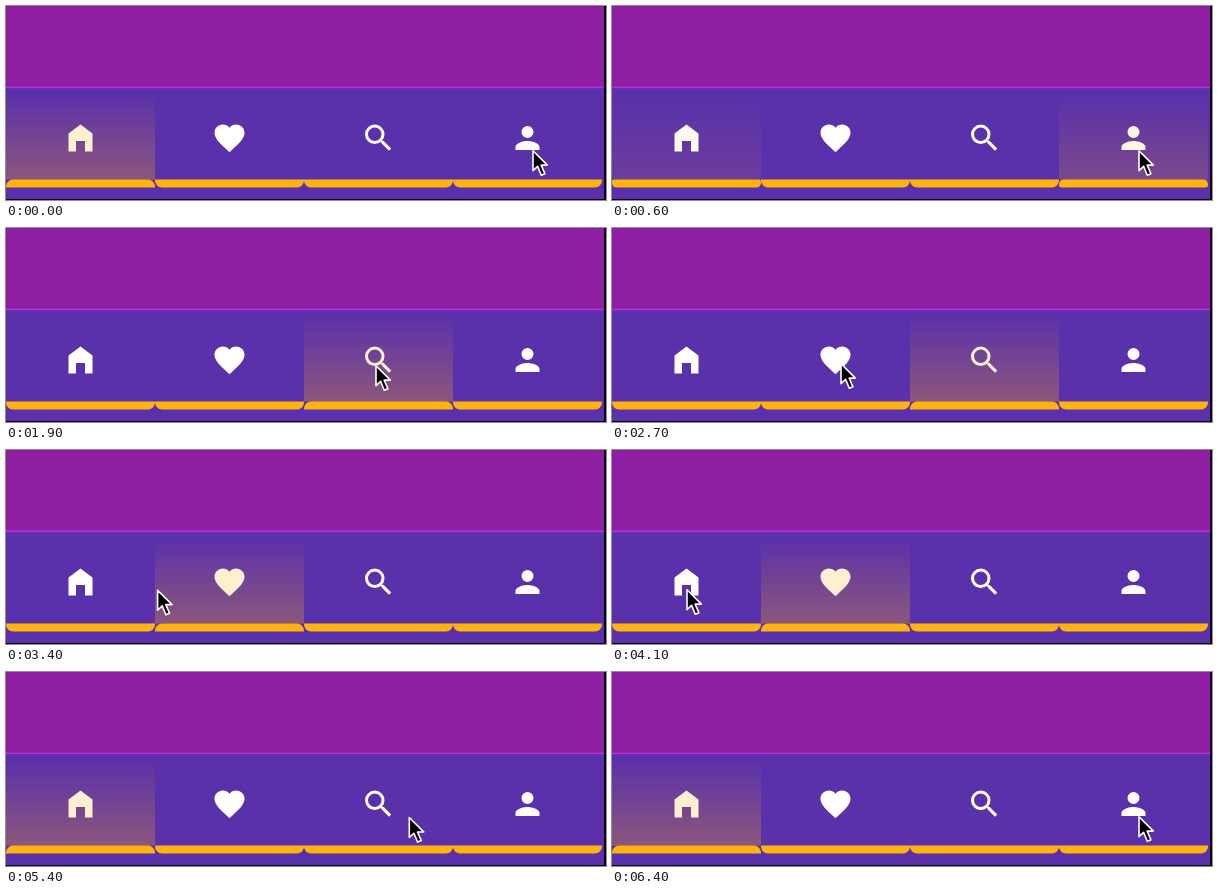
These frames come from a looping animation (600x194 px, 6500 ms). An HTML page:

```html
<!DOCTYPE html>
<html lang="en">
<head>
<meta charset="utf-8">
<title>Tab bar</title>
<style>
  html, body { margin: 0; width: 100%; height: 100%; overflow: hidden; background: #0d0518; }
  svg { display: block; width: 600px; height: 194px; }
</style>
</head>
<body>
<svg viewBox="0 0 600 194" xmlns="http://www.w3.org/2000/svg">
  <defs>
    <linearGradient id="glow" x1="0" y1="0" x2="0" y2="1">
      <stop offset="0.04" stop-color="#ffb30f" stop-opacity="0"/>
      <stop offset="1" stop-color="#ffb30f" stop-opacity="0.3"/>
    </linearGradient>
  </defs>
  <rect width="600" height="194" fill="#0d0518"/>
  <rect width="598" height="82" fill="#8e1fa2"/>
  <rect y="82" width="598" height="111" fill="#5a30ab"/>
  <rect y="80.6" width="598" height="1.6" fill="#b92fe0"/>
  <g id="tabs"></g>
  <path id="cursor" d="M1 1.7v20l4.6-4.3 3.7 8.8 3.6-1.5-3.7-8.6h6.2z"
        fill="#000" stroke="#fff" stroke-width="1.6" stroke-linejoin="round"/>
</svg>
<script>
const LOOP = 6500, FADE = 250;
const TAB_WIDTH = 149, BAR_TOP = 173.6, BAR_HEIGHT = 8, RADIUS = 7;

// Drawn on a 24-unit grid
const ICONS = {
  home: 'M4 21V9l8-6 8 6v12h-5v-7H9v7z',
  heart: 'M12 21.35l-1.45-1.32C5.4 15.36 2 12.28 2 8.5 2 5.42 4.42 3 7.5 3c1.74 0 3.41.81 4.5 2.09C13.09 3.81 14.76 3 16.5 3 19.58 3 22 5.42 22 8.5c0 3.78-3.4 6.86-8.55 11.54z',
  search: 'M9.5 3a6.5 6.5 0 0 0 0 13a6.5 6.5 0 0 0 0-13zm0 2a4.5 4.5 0 0 1 0 9a4.5 4.5 0 0 1 0-9zM13.7 14.4l.3 1.1 5 5 1.5-1.5-5-5-1.1-.3z',
  person: 'M12 4a4 4 0 0 1 0 8a4 4 0 0 1 0-8zm0 10c-2.67 0-8 1.34-8 4v2h16v-2c0-2.66-5.33-4-8-4z'
};

// The pointer rests on each tab, clicks it, then leaves for the next
const TOUR = [
  { tab: 3, x: 526, y: 143, click: 450, leave: 710 },
  { tab: 2, x: 369, y: 136, click: 1450, leave: 1930 },
  { tab: 1, x: 228, y: 134, click: 2950, leave: 3110 },
  { tab: 0, x: 74, y: 138, click: 4350, leave: 4850 }
];

const clamp = u => Math.min(1, Math.max(0, u));
const ease = u => u * u * (3 - 2 * u);
const mix = (a, b, u) => a + (b - a) * u;

function add(parent, tag, attrs) {
  const node = document.createElementNS('http://www.w3.org/2000/svg', tag);
  for (const key in attrs) node.setAttribute(key, attrs[key]);
  return parent.appendChild(node);
}

const group = document.getElementById('tabs');
const cursor = document.getElementById('cursor');
const tabs = Object.values(ICONS).map((d, i) => {
  const x = i * TAB_WIDTH;
  return {
    x,
    glow: add(group, 'rect', { x, y: 83, width: TAB_WIDTH, height: BAR_TOP - 83, fill: 'url(#glow)' }),
    bar: add(group, 'path', { fill: '#ffb30f' }),
    icon: add(group, 'path', {
      d, transform: `translate(${x + TAB_WIDTH / 2 - 18} 114.1) scale(1.5)`
    })
  };
});

// Bar with separate corner radii for its top and bottom edges
function barPath(x, top, bottom) {
  const arc = (r, dx, dy) => `a${r} ${r} 0 0 1 ${dx * r} ${dy * r}`;
  const side = BAR_HEIGHT - top - bottom;
  return `M${x + top} ${BAR_TOP}h${TAB_WIDTH - 2 * top}${arc(top, 1, 1)}v${side}` +
    `${arc(bottom, -1, 1)}h${2 * bottom - TAB_WIDTH}${arc(bottom, -1, -1)}v${-side}${arc(top, 1, -1)}z`;
}

function selection(tab, t) {
  let level = tab === 0 ? 1 : 0;
  for (const stop of TOUR) {
    level = mix(level, stop.tab === tab ? 1 : 0, ease(clamp((t - stop.click) / FADE)));
  }
  return level;
}

function pointerAt(t) {
  let { x, y } = TOUR[0];
  TOUR.forEach((stop, i) => {
    const next = TOUR[(i + 1) % TOUR.length];
    const duration = 450 + 130 * Math.abs(next.tab - stop.tab);
    const u = clamp((t - stop.leave) / duration);
    if (u === 0) return;
    x = mix(stop.x, next.x, ease(u));
    y = mix(stop.y, next.y, ease(u)) + 2.5 * Math.sin(Math.PI * u);
  });
  return `${x} ${y}`;
}

function draw(t) {
  tabs.forEach((tab, i) => {
    const level = selection(i, t);
    tab.glow.setAttribute('opacity', level);
    tab.bar.setAttribute('d', barPath(tab.x, RADIUS * level, RADIUS * (1 - level)));
    tab.icon.setAttribute('fill', `rgb(${mix(255, 253, level)},${mix(255, 240, level)},${mix(255, 208, level)})`);
  });
  cursor.setAttribute('transform', `translate(${pointerAt(t)})`);
}

const start = performance.now();
function tick() {
  draw((performance.now() - start) % LOOP);
  requestAnimationFrame(tick);
}
tick();
</script>
</body>
</html>
```
